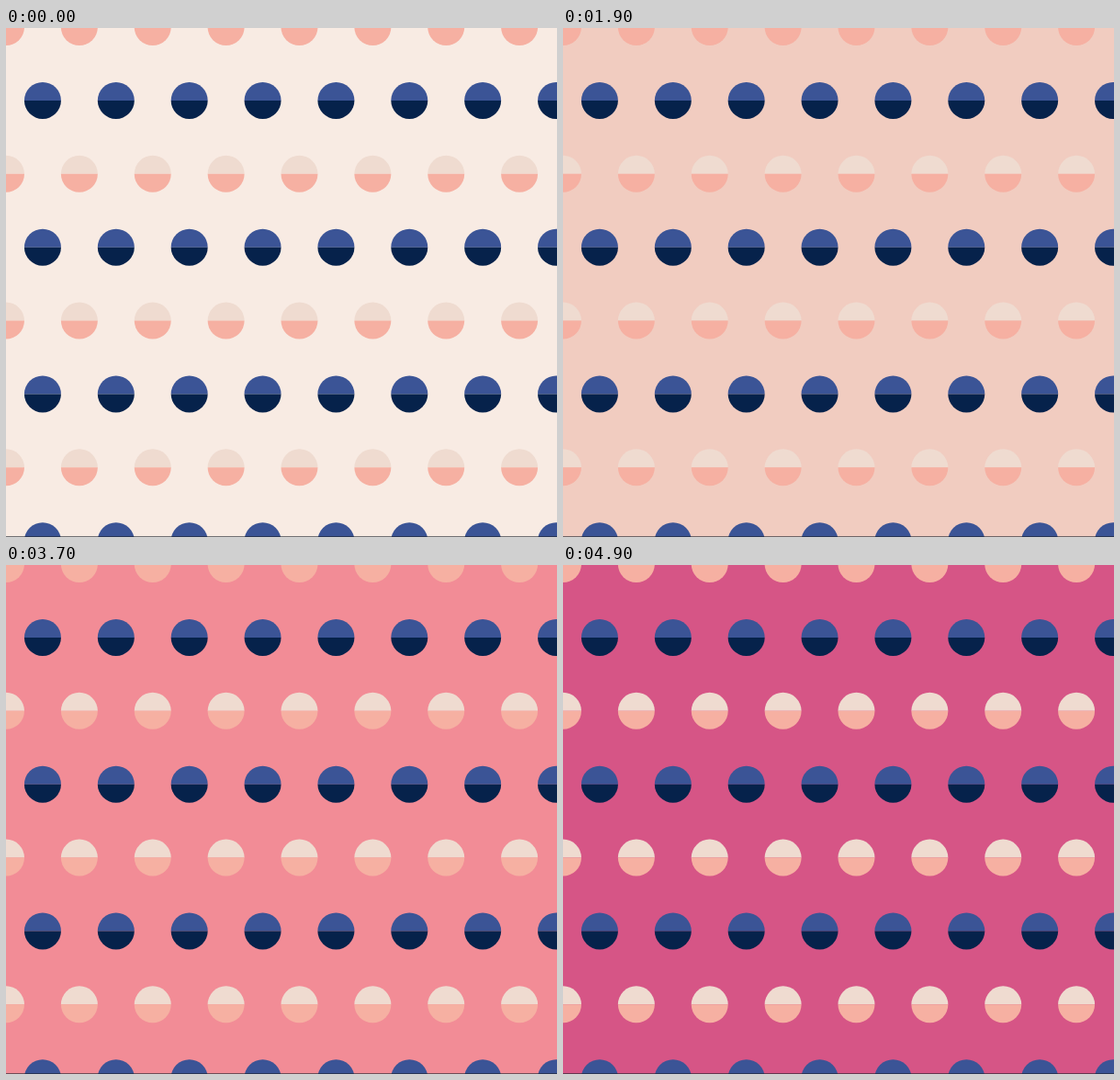
Write an HTML page with a canvas that moves like this. It is 600x554 px and loops after 5000 ms.

```html
<!DOCTYPE html>
<html lang="en">
<head>
<meta charset="utf-8">
<title>Two-tone dots</title>
<style>
  html, body { margin: 0; width: 100%; height: 100%; overflow: hidden; background: #f8ebe3; }
  canvas { display: block; width: 600px; height: 554px; }
</style>
</head>
<body>
<canvas id="stage" width="600" height="554"></canvas>
<script>
const W = 600, H = 554, LOOP = 5000, STEP = 100;
const GAP = 79.87, RADIUS = 20, TOP = -0.9;
const WARM = ['#efdbd0', '#f6b0a2'];
const BLUE = ['#3b5496', '#06224b'];

// time in ms, then the background colour reached
const KEYS = [
  [0, 248, 235, 227],
  [800, 242, 224, 215],
  [1300, 239, 219, 208],
  [3000, 246, 176, 162],
  [4700, 236, 88, 134],
  [4900, 214, 85, 134]
];

const ctx = document.getElementById('stage').getContext('2d');

function background(t) {
  let i = 0;
  while (i < KEYS.length - 2 && t >= KEYS[i + 1][0]) i++;
  const a = KEYS[i], b = KEYS[i + 1];
  const p = (t - a[0]) / (b[0] - a[0]);
  const mix = [1, 2, 3].map(k => Math.round(a[k] + (b[k] - a[k]) * p));
  return `rgb(${mix})`;
}

function half(x, y, from, color) {
  ctx.fillStyle = color;
  ctx.beginPath();
  ctx.arc(x, y, RADIUS, from, from + Math.PI);
  ctx.fill();
}

function draw(t) {
  ctx.fillStyle = background(t);
  ctx.fillRect(0, 0, W, H);
  for (let row = 0; row < 8; row++) {
    const odd = row % 2;
    const [upper, lower] = odd ? BLUE : WARM;
    const y = TOP + row * GAP;
    for (let col = 0; col < 8; col++) {
      const x = (col + odd / 2) * GAP;
      half(x, y, Math.PI, upper);
      half(x, y, 0, lower);
    }
  }
  ctx.fillStyle = 'rgba(25, 32, 42, 0.6)';
  ctx.fillRect(0, H - 1, W, 1);
}

let start = null, shown = -1;
function tick(now) {
  if (start === null) start = now;
  const t = Math.floor(((now - start) % LOOP) / STEP) * STEP;
  if (t !== shown) draw(shown = t);
  requestAnimationFrame(tick);
}
draw(0);
requestAnimationFrame(tick);
</script>
</body>
</html>
```
